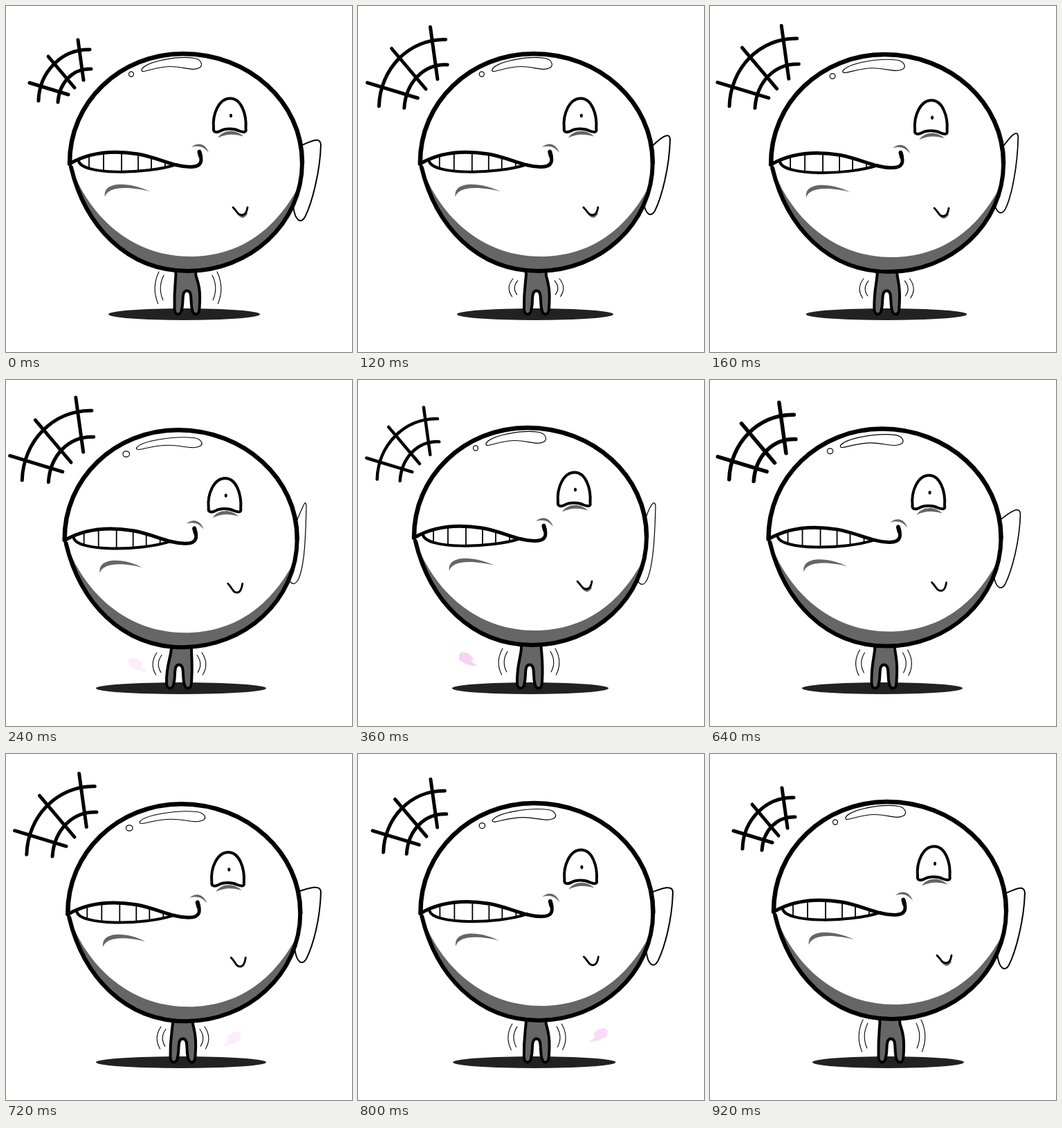
Write an HTML page with a canvas that moves like this. It is 500 by 500 pixels and loops after 960 ms.

```html
<!DOCTYPE html>
<html lang="en">
<head>
<meta charset="utf-8">
<title>Wobbling head</title>
<style>
  html, body { margin: 0; width: 100%; height: 100%; overflow: hidden; background: #fff; }
  canvas { display: block; }
</style>
</head>
<body>
<canvas id="stage" width="500" height="500"></canvas>
<script>
const ctx = document.getElementById('stage').getContext('2d');
const LOOP = 960, STEP = 40, GREY = '#666';

const poses = [
  { t: 0,   head: 1,     dip: 0, foot: 262,   top: 259.5, ear: [455, 195, 19, 424, 311, 2],   ground: [257.5, 109.5], shake: [221, 305, 23], burst: [99, 118, 1, 5] },
  { t: 120, head: -1.2,  dip: 0, foot: 258.5, top: 257,   ear: [451, 188, 14, 421, 302, 2],   ground: [256, 113],     shake: [224, 291, 13], burst: [98, 120, 1.3, 5] },
  { t: 240, head: -6.3,  dip: 1, foot: 250.5, top: 253,   ear: [434, 178, 4, 414, 295, 1.2],  ground: [253, 123],     shake: [218, 283, 16], burst: [94, 119, 1.36, 5] },
  { t: 360, head: -10,   dip: 0, foot: 248.5, top: 250,   ear: [430, 178, 9, 409, 296, 1.2],  ground: [249, 113],     shake: [209, 285, 19], burst: [89, 121, 1.18, 4.5] },
  { t: 520, head: -11.2, dip: 0, foot: 248,   top: 249.5, ear: [442, 183, 7, 411, 300, 1.2],  ground: [245, 109],     shake: [209, 284, 21], burst: [88, 119.5, 1.2, 6] },
  { t: 720, head: -1.7,  dip: 1, foot: 256,   top: 255,   ear: [455, 194, 25, 426, 302, 2],   ground: [253, 123],     shake: [224, 287, 16], burst: [99, 120, 1.33, 5] }
];
// The fifth pose is held briefly before the swing back.
poses.splice(5, 0, { ...poses[4], t: 560 });
poses.push({ ...poses[0], t: 920 }, { ...poses[0], t: LOOP });

const mix = (a, b, k) => Array.isArray(a) ? a.map((v, i) => mix(v, b[i], k)) : a + (b - a) * k;

function poseAt(t) {
  const i = poses.findIndex(p => p.t > t);
  const a = poses[i - 1], b = poses[i], k = (t - a.t) / (b.t - a.t);
  return Object.fromEntries(Object.keys(a).map(key => [key, mix(a[key], b[key], k)]));
}

function shape(d, fill, width, color = '#000') {
  const path = new Path2D(d);
  if (fill) { ctx.fillStyle = fill; ctx.fill(path); }
  if (width) { ctx.lineWidth = width; ctx.strokeStyle = color; ctx.stroke(path); }
}

function ellipse(x, y, rx, ry, fill, width) {
  ctx.beginPath();
  ctx.ellipse(x, y, rx, ry, 0, 0, 7);
  if (fill) { ctx.fillStyle = fill; ctx.fill(); }
  if (width) { ctx.lineWidth = width; ctx.strokeStyle = '#000'; ctx.stroke(); }
}

function shifted(x, y, draw) {
  ctx.save();
  ctx.translate(x, y);
  draw();
  ctx.restore();
}

function drawBurst([x, y, s, width]) {
  const at = (px, py) => `${x + (px - 99) * s} ${y + (py - 118) * s} `;
  shape('M' + at(47, 137) + 'C' + at(48, 96) + at(80, 62) + at(121, 63) +
    'M' + at(75, 139) + 'C' + at(77, 110) + at(97, 90) + at(123, 91) +
    'M' + at(34, 111) + 'L' + at(90, 128) +
    'M' + at(61, 73) + 'L' + at(99, 118) +
    'M' + at(104, 49) + 'L' + at(112, 107), null, width);
}

function drawPuff(t) {
  const age = t % 480 - 200;
  if (age < 0 || age > 200) return;
  ctx.save();
  if (t >= 480) { ctx.translate(517, 0); ctx.scale(-1, 1); }
  ctx.translate(190 - (age - 40) * .26, 412 - (age - 40) * .065);
  ctx.globalAlpha = Math.min(1, .2 + age / 200);
  shape('M-13-7L-9-11L1-9L8-2L5 2L14 10L-1 7L-12 1Z', '#f4d3f6');
  ctx.restore();
}

function drawShake([left, right, h], y) {
  const arc = (x, r, bend) => `M${x} ${y - r}Q${x + bend} ${y} ${x + bend / 8} ${y + r}`;
  shape(arc(left, h, -11) + arc(left + 7, h * .78, -9) +
    arc(right, h, 11) + arc(right - 7, h * .78, 9), null, 1.1);
}

function drawLegs(foot, top) {
  shape(`M${top - 15} 376L${top - 14} 388C${top - 15} 402 ${foot - 19} 412 ${foot - 18.5} 438
    C${foot - 18} 448 ${foot - 9} 448 ${foot - 8} 438
    C${foot - 5} 428 ${foot - 9} 411.5 ${foot - .5} 411.5
    C${foot + 8} 411.5 ${foot + 4} 428 ${foot + 7} 439
    C${foot + 9} 448 ${foot + 17} 448 ${foot + 17.5} 437
    C${foot + 19} 415 ${foot + 18} 406 ${top + 15} 390L${top + 14} 376Z`, GREY, 4);
}

function drawEar([tx, ty, w, bx, by, width], head) {
  shape(`M${423 + head} ${214 - w * .6}C${tx - w} ${ty + 3} ${tx - 1} ${ty - 8} ${tx} ${ty + 5}
    C${tx - 1} ${ty + 45} ${bx + 18} ${by - 26} ${bx + 8} ${by - 6}
    C${bx + 3} ${by + 3} ${bx - 6} ${by + 2} ${bx - 9} ${by - 22}`, '#fff', width);
}

function drawSkull() {
  const dome = 'M91 227C90 138 164 68 255 68C350 68 427 138 427 225';
  const jaw = 'C427 315 350 382 262 382', back = 'C173 382 113 316 93 232';
  shape(dome + jaw + back + 'Z', '#fff');
  shape('M94 234C125 314 190 361 265 361C340 361 390 319 421 261C402 333 335 382 262 382' + back + 'Z', GREY);
  shape(dome, null, 6.5);
  shape('M427 225' + jaw + back, null, 6);
}

function drawMouth() {
  const opening = 'M104 222C125 210 165 208 190 213C215 218 230 225 245 228C200 243 108 243 104 223Z';
  shape(opening, '#fff');
  ctx.save();
  ctx.clip(new Path2D(opening));
  shape([119, 140, 166, 190, 209, 229].map(x => `M${x} 205V245`).join(''), null, 1.8);
  ctx.restore();
  shape('M245 228C200 243 108 243 104 223', null, 4);
  shape('M91 227C125 207 165 209 190 213C222 219 240 231 265 231.5C283 232 283 222 278.5 209', null, 5);
  shape('M278.5 210L280 216', null, 6);
  shape('M267 203C278 194 288 199 292 211C285 202 278 200 267 203Z', GREY);
}

function drawEye() {
  shape(`M299 176C297 155 307 133 323 133C339 133 347 156 345.5 177C347 183 341 182 336 180
    C328 176 316 176 309 180C303 183 298 182 299 176Z`, '#fff', 4);
  ellipse(324, 158, 2, 2.8, '#000');
  shape('M305 190C313 178 331 177 342 188C329 184 317 184 305 190Z', GREY);
}

function drawShine(dip) {
  shifted(195, 73, () => {
    ctx.scale(1 + dip * .09, 1 - dip * .12);
    shape('M0 18C7 7 50-2 77 2C86 4 90 13 83 16C73 21 60 14 42 14C25 14 10 20 3 21Q-1 21 0 18Z', '#fff', 1.2);
  });
  ellipse(180, 98, 3.5 + dip * 1.3, 3.6 + dip * .6, '#fff', 1.2);
}

function drawHead({ head, dip }) {
  shifted(head, 1 + dip * 3.2, () => {
    drawSkull();
    const edge = 207 - dip * 4;
    shape(`M142 275C138 251 178 253 ${edge} 267C185 261 146 257 142 275Z`, GREY);
    if (dip < .5) shape('M334 299Q341 309 347 299Q342 304 334 299Z', GREY, 2, GREY);
    shape(`M327 290C334 297 334 ${301 + dip * 2} 340 ${301 + dip * 2}C345 ${301 + dip * 2} 347 297 348 290`, null, 2.8);
  });
  shifted(head, 1 + dip * 3.8, drawMouth);
  shifted(head, .5 + dip * 8.5, () => { drawEye(); drawShine(dip); });
}

function render(now) {
  const t = Math.floor(now % LOOP / STEP) * STEP, p = poseAt(t);
  ctx.fillStyle = '#fff';
  ctx.fillRect(0, 0, 500, 500);
  ctx.lineCap = ctx.lineJoin = 'round';
  ellipse(p.ground[0], 445.5, p.ground[1], 8.5, '#222');
  drawBurst(p.burst);
  drawPuff(t);
  drawShake(p.shake, 407 + p.dip * 3);
  drawLegs(p.foot, p.top);
  drawEar(p.ear, p.head);
  drawHead(p);
}

let start;
function tick(now) {
  start ??= now;
  render(now - start);
  requestAnimationFrame(tick);
}
render(0);
requestAnimationFrame(tick);
</script>
</body>
</html>
```
